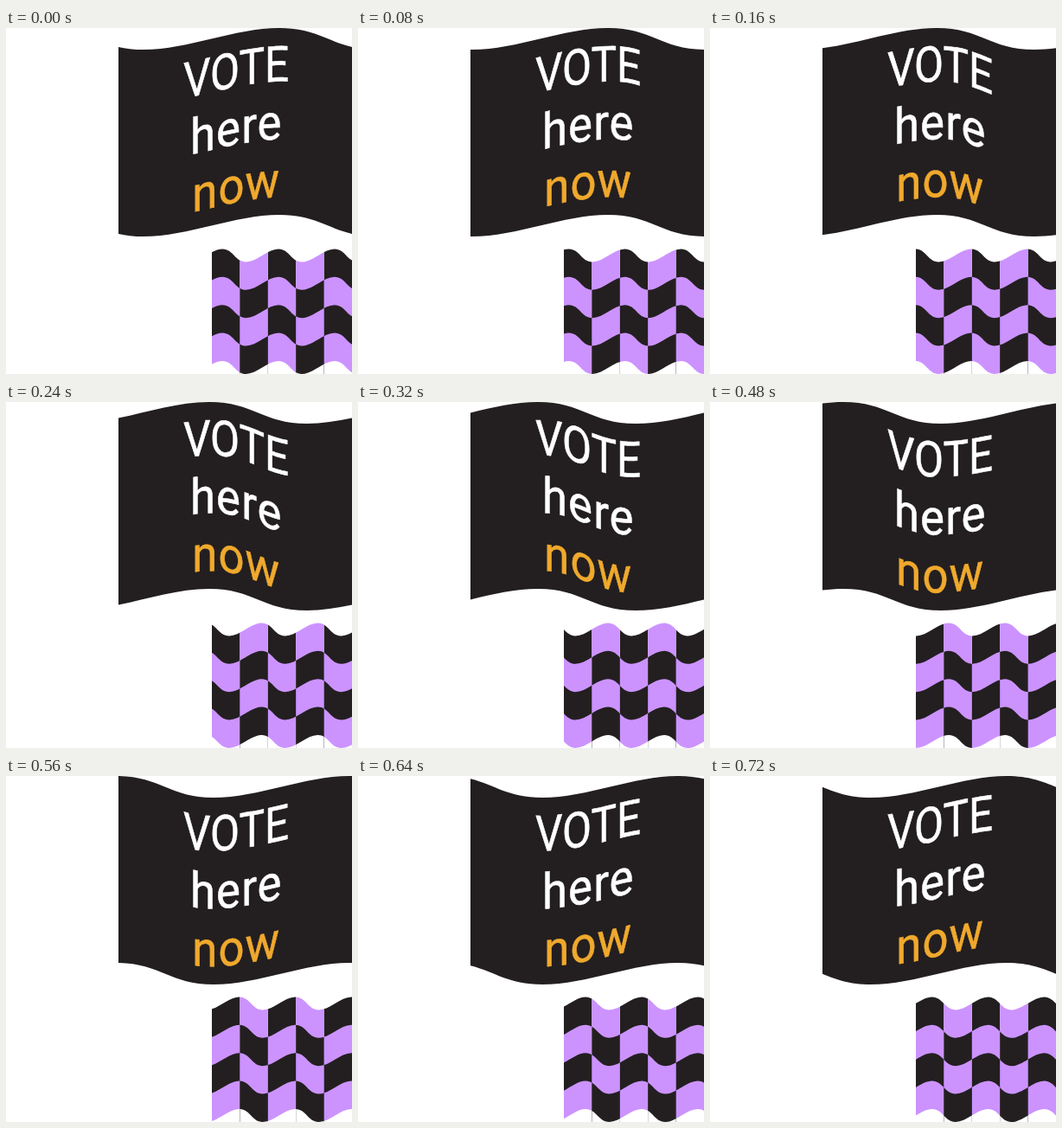
These frames come from a looping animation (400 by 400 pixels, 800 ms). An HTML page without scripts:

```html
<!DOCTYPE html>
<html lang="en">
<head>
<meta charset="utf-8">
<title>Vote here now</title>
<style>
  @property --step { syntax: "<number>"; inherits: true; initial-value: 0; }

  html, body { margin: 0; width: 100%; height: 100%; overflow: hidden; background: #fff; }

  svg {
    display: block;
    width: 400px;
    height: 400px;
    animation: advance 800ms steps(10) infinite;
  }
  @keyframes advance { from { --step: 0; } to { --step: 10; } }

  .wave { transform: translateX(calc(var(--step) * -27px)); }

  .ink { fill: #231f20; }
  .lilac { fill: #cc93ff; }
  .paper { fill: #fff; }

  text {
    font: 400 57.2px Roboto, sans-serif;
    text-anchor: middle;
    text-rendering: geometricPrecision;
    fill: currentColor;
    stroke: currentColor;
    stroke-width: .6px;
    color: #fff;
  }
  .lower { letter-spacing: 1.2px; }
  .gold { color: #f0a92d; }

  /* Each 9px slice of the words is lifted and sheared along the wave. */
  .slices use {
    --a: calc(var(--i) * 12deg + var(--step) * 36deg - 220.7deg);
    --lift: calc(12.5 + 12.39 * sin(var(--a)) + 1.75 * sin(2 * var(--a)) + .49 * sin(3 * var(--a)));
    --slope: calc(.02327 * (12.39 * cos(var(--a)) + 3.5 * cos(2 * var(--a)) + 1.47 * cos(3 * var(--a))));
    clip-path: inset(0 calc(117px - var(--i) * 9px) 0 calc(var(--i) * 9px));
    transform-box: fill-box;
    transform-origin: calc(var(--i) * 9px + 4.5px) 0;
    transform: translateY(calc(var(--lift) * 1px)) skewY(atan(var(--slope)));
  }
</style>
</head>
<body>
<svg viewBox="0 0 400 400" xmlns="http://www.w3.org/2000/svg">
  <defs>
    <!-- Five wave lengths of 270, filled downwards -->
    <path id="sea" d="M0 0
      c52 0 61 25 113 25s105-25 157-25
      c52 0 61 25 113 25s105-25 157-25
      c52 0 61 25 113 25s105-25 157-25
      c52 0 61 25 113 25s105-25 157-25
      c52 0 61 25 113 25s105-25 157-25
      V300H0Z"/>

    <clipPath id="flagArea"><path d="M130 0H400V242H130Z"/></clipPath>
    <clipPath id="evenColumns"><path d="M238 250h32.4v150h-32.4zM302.8 250h32.4v150h-32.4zM367.6 250h32.4v150h-32.4z"/></clipPath>
    <clipPath id="oddColumns"><path d="M270.4 250h32.4v150h-32.4zM335.2 250h32.4v150h-32.4z"/></clipPath>

    <g id="words">
      <rect x="203" y="-20" width="126" height="260" fill="none"/>
      <text transform="translate(266 61.6) scale(.865 1)">VOTE</text>
      <text class="lower" transform="translate(266.3 128.4) scale(.92 1)">here</text>
      <text class="lower gold" transform="translate(266.2 195.3) scale(.92 1)">now</text>
    </g>

    <g id="darkRow"><use href="#sea" class="ink"/><use href="#sea" y="54" class="lilac"/></g>
    <g id="lightRow"><use href="#sea" class="lilac"/><use href="#sea" y="54" class="ink"/></g>
  </defs>

  <g clip-path="url(#flagArea)">
    <g transform="translate(46 0)">
      <g class="wave">
        <use href="#sea" class="ink"/>
        <use href="#sea" y="216" class="paper"/>
      </g>
    </g>
  </g>

  <g class="slices">
    <use href="#words" style="--i:0"/>
    <use href="#words" style="--i:1"/>
    <use href="#words" style="--i:2"/>
    <use href="#words" style="--i:3"/>
    <use href="#words" style="--i:4"/>
    <use href="#words" style="--i:5"/>
    <use href="#words" style="--i:6"/>
    <use href="#words" style="--i:7"/>
    <use href="#words" style="--i:8"/>
    <use href="#words" style="--i:9"/>
    <use href="#words" style="--i:10"/>
    <use href="#words" style="--i:11"/>
    <use href="#words" style="--i:12"/>
    <use href="#words" style="--i:13"/>
  </g>

  <g clip-path="url(#evenColumns)">
    <g transform="translate(185.44 255.4) scale(.24 .6)">
      <g class="wave">
        <use href="#darkRow"/>
        <use href="#darkRow" y="108"/>
        <use href="#sea" y="216" class="paper"/>
      </g>
    </g>
  </g>
  <g clip-path="url(#oddColumns)">
    <g transform="translate(185.44 255.4) scale(.24 .6)">
      <g class="wave">
        <use href="#lightRow"/>
        <use href="#lightRow" y="108"/>
        <use href="#sea" y="216" class="paper"/>
      </g>
    </g>
  </g>
</svg>
</body>
</html>
```
